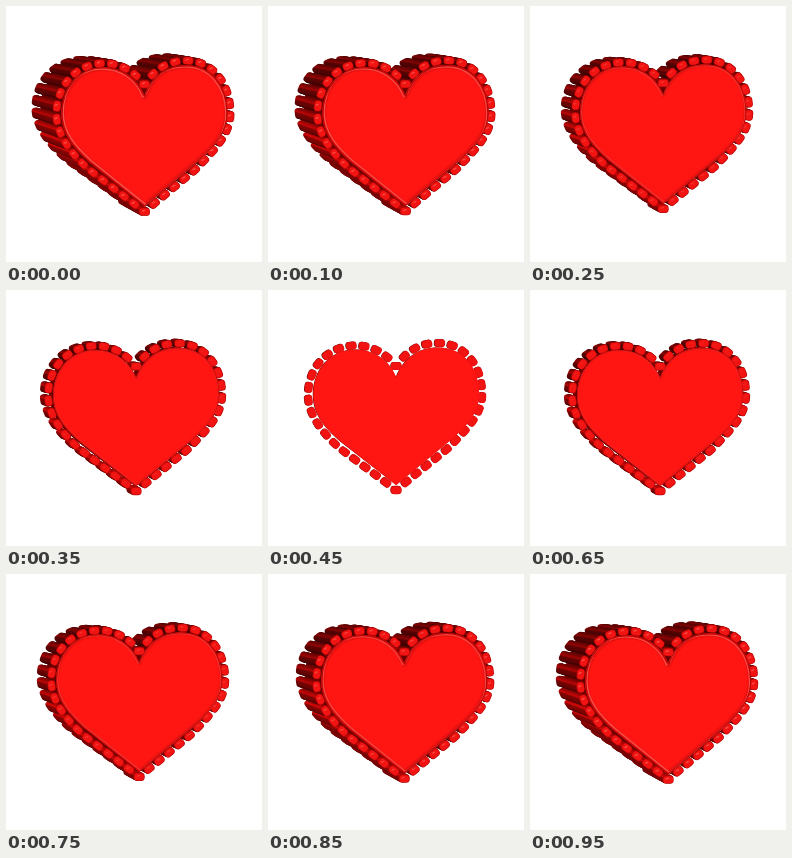
These frames come from a looping animation (256x256 px, 1000 ms). An HTML page with a canvas:

```html
<!DOCTYPE html>
<html lang="en">
<head>
<meta charset="utf-8">
<title>Heart</title>
<style>
  html, body { margin: 0; width: 100%; height: 100%; overflow: hidden; background: #fff; }
  canvas { display: block; width: 256px; height: 256px; }
</style>
</head>
<body>
<canvas id="stage" width="256" height="256"></canvas>
<script>
const ctx = document.getElementById('stage').getContext('2d');
const PER_SIDE = 20, LOOP = 1000, STEP = 50;

const leftRim = 'M128 76C118 64 105 55.5 88 55.5C60 55.5 40 77 40 105' +
  'C40 128 60 148 72 158.5L128 200';
const rightRim = 'M128 200L179 159C200 138 214 124 214 104' +
  'C214 75 196 53 170 53C150 53 138 62 128 76';
const face = new Path2D('M128 87C121 70 106 59.5 87 59.5C62 59.5 45 80 45 105' +
  'C45 125 58 139 73 152L128 195L184 149C200 135 211 122 211 104' +
  'C211 77 195 57.5 170 57.5C151 57.5 136 67 128 87Z');

const stud = new Path2D();
stud.roundRect(-5.4, -4, 10.8, 8, 3.4);

// Shading across a log, perpendicular to the extrusion; upper logs are darker
function logShade(angle, y) {
  const a = Math.atan2(-0.95, 0.32) - angle;
  const dx = Math.cos(a) * 6, dy = Math.sin(a) * 6;
  const g = ctx.createLinearGradient(dx, dy, -dx, -dy);
  const light = 19 + 13 * Math.min(1, (y - 53) / 80);
  [[0, 0.75], [0.3, 1.15], [0.42, 1.35], [0.55, 0.85], [0.8, 0.75], [1, 0.45]]
    .forEach(([at, k]) => g.addColorStop(at, `hsl(0 94% ${light * k}%)`));
  return g;
}

function placeStuds(d) {
  const path = document.createElementNS('http://www.w3.org/2000/svg', 'path');
  path.setAttribute('d', d);
  const total = path.getTotalLength();
  return Array.from({ length: PER_SIDE }, (_, i) => {
    const s = i * total / PER_SIDE;
    const p = path.getPointAtLength(s);
    const a = path.getPointAtLength(s - 3), b = path.getPointAtLength(s + 3);
    // The first stud of each side sits on the axis and lies flat
    const angle = i ? Math.atan2(b.y - a.y, b.x - a.x) : 0;
    return { x: p.x, y: p.y, angle, shade: logShade(angle, p.y) };
  });
}
const studs = [...placeStuds(leftRim), ...placeStuds(rightRim)];

function setLayer(z) {
  const s = 1 + 0.028 * z;
  ctx.setTransform(1, 0, 0, s, 10.5 * z, 105 * (1 - s) + 3.1 * z);
}

function eachStud(paint) {
  for (const p of studs) {
    ctx.save();
    ctx.translate(p.x, p.y);
    ctx.rotate(p.angle);
    paint(p);
    ctx.restore();
  }
}

function strokeFace(color, width, shift = 0) {
  ctx.save();
  ctx.translate(shift, -shift);
  ctx.strokeStyle = color;
  ctx.lineWidth = width;
  ctx.stroke(face);
  ctx.restore();
}

function drawFront(d) {
  eachStud(p => {
    ctx.fillStyle = d > 0.1 ? '#b40606' : '#e01010';
    ctx.fill(stud);
    ctx.scale(0.9, 0.84);
    ctx.fillStyle = '#f21412';
    ctx.fill(stud);
    // Small glint facing up and left
    ctx.rotate(-p.angle);
    ctx.globalAlpha = 0.5 * d;
    ctx.fillStyle = '#ff8478';
    ctx.beginPath();
    ctx.ellipse(-1, -1.2, 2.2, 0.9, -0.4, 0, 7);
    ctx.fill();
  });

  ctx.fillStyle = '#ff1512';
  ctx.fill(face);
  if (d < 0.05) return;
  const size = Math.min(1, 0.25 + d);
  ctx.save();
  ctx.clip(face);
  ctx.lineJoin = 'round';
  strokeFace('#ea1210', 7 * size);
  // Light catches the lower left and upper right of the bevel
  ctx.globalAlpha = 0.55 * d;
  strokeFace('#ff8a80', 1.3, 1.7 * size);
  strokeFace('#ff8a80', 1.1, -1.7 * size);
  ctx.globalAlpha = 1;
  strokeFace('#b40606', 2 * size);
  ctx.restore();
}

function draw(ms) {
  const d = (1 + Math.cos(2 * Math.PI * ms / LOOP)) / 2;
  ctx.setTransform(1, 0, 0, 1, 0, 0);
  ctx.fillStyle = '#fff';
  ctx.fillRect(0, 0, 256, 256);
  const layers = Math.ceil(26 * d);
  for (let i = 0; i < layers; i++) {
    setLayer(d * (2 * i / layers - 1));
    ctx.fillStyle = '#6a0202';
    ctx.fill(face);
    eachStud(p => {
      ctx.fillStyle = p.shade;
      ctx.fill(stud);
    });
  }
  setLayer(d);
  drawFront(d);
}

let shown = -1;
function tick() {
  const step = Math.floor(performance.now() % LOOP / STEP);
  if (step !== shown) draw((shown = step) * STEP);
  requestAnimationFrame(tick);
}
tick();
</script>
</body>
</html>
```
